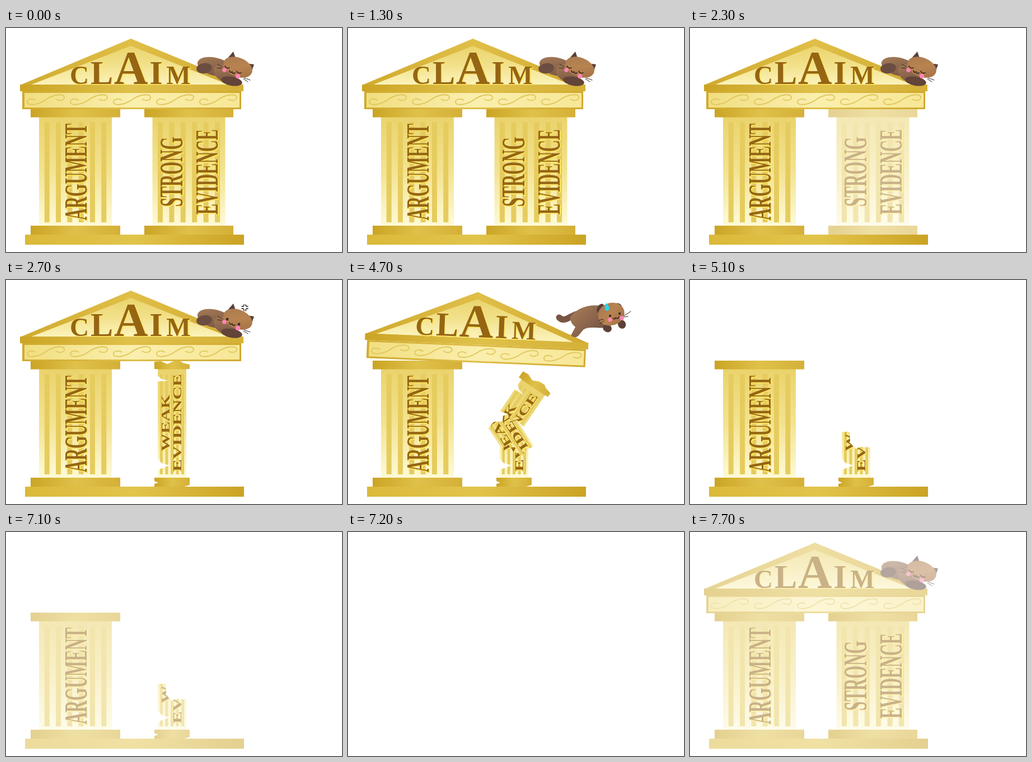
Animation of 600x400 px, one loop 7.8 s. Source, as an HTML page:

```html
<!DOCTYPE html>
<html lang="en">
<head>
<meta charset="utf-8">
<title>Claim, argument, evidence</title>
<style>
  html, body { margin: 0; width: 100%; height: 100%; overflow: hidden; background: #fff; }
  svg { display: block; width: 100vw; height: 100vh; }
  text { font-family: "Liberation Serif", serif; font-weight: bold; }
  .shine { fill: #ffec78; stroke: #ffe655; stroke-width: 1; }
  .ink { fill: #956513; }
  .line { fill: none; stroke: #35231f; stroke-width: 1.6; stroke-linecap: round; stroke-linejoin: round; }
  .thin { stroke-width: 1; }
  .pink { fill: #ff85b5; }
  .dark { fill: #3f2a25; }
</style>
</head>
<body>
<svg id="stage" viewBox="0 0 600 400"></svg>
<script>
const stage = document.getElementById('stage');

const gradient = (id, colors, direction = '') =>
  `<linearGradient id="${id}" ${direction}>` + colors.map((c, i) =>
    `<stop offset="${i / (colors.length - 1)}" stop-color="${c}"/>`).join('') + '</linearGradient>';
const down = 'x1="0" y1="0" x2="0" y2="1"';
const diagonal = 'x1="0" y1="0" x2="1" y2="1"';

const rect = (x, y, right, bottom, fill) =>
  `<rect x="${x}" y="${y}" width="${right - x}" height="${bottom - y}" fill="${fill}"/>`;
const poly = (points, fill = '') => `<polygon points="${points}" ${fill && `fill="${fill}"`}/>`;
const oval = (x, y, rx, ry, fill, turn = 0) =>
  `<ellipse cx="${x}" cy="${y}" rx="${rx}" ry="${ry}" fill="${fill}" transform="rotate(${turn} ${x} ${y})"/>`;
const dot = (x, y, r, style) => `<circle cx="${x}" cy="${y}" r="${r}" class="${style}"/>`;
const line = (d, style = '') => `<path class="line ${style}" d="${d}"/>`;
const group = (id, content) => `<g id="${id}">${content}</g>`;

// Engraved lettering: a bright lower edge under the dark face.
const engrave = (text, size, place, anchor = 'start') =>
  ['shine', 'ink'].map((style, i) =>
    `<g transform="translate(${i ? 0 : 1.3} ${i ? 0 : 1.3})"><text class="${style}" font-size="${size}"
      text-anchor="${anchor}" transform="${place}">${text}</text></g>`).join('');
const upward = (text, size, x, y, tall) =>
  engrave(text, size, `translate(${x} ${y}) rotate(-90) scale(1 ${tall})`);

function column(left, right, inset, flutes, fluteWidth) {
  const x = left + inset, end = right - inset;
  const margin = inset * .65, pitch = (end - x - 2 * margin - fluteWidth) / (flutes - 1);
  let art = rect(x, 159, end, 353, 'url(#shaft)');
  for (let i = 0; i < flutes; i++) {
    const start = x + margin + i * pitch;
    art += rect(start, 168, start + fluteWidth, 347, '#e6cc5e');
  }
  return art + rect(left, 144, right, 159.5, 'url(#gold)') + rect(left, 353, right, 369, 'url(#gold)');
}

const swirl = x => `<path d="M-18 1C-26-4-34 0-33 5C-31 11-14 10 0 0S31-11 33-5C34 0 26 4 18-1"
  transform="translate(${x} 128)" fill="none" stroke="#e0c65c" stroke-width="1.8"/>`;

const roof =
  poly('25,102 223,19 424,102', 'url(#edge)') +
  poly('44,101.5 223,32 398,101.5', 'url(#gable)') +
  rect(25, 101, 424, 113, 'url(#gold)') +
  rect(29, 113, 420, 145, 'url(#edge)') +
  rect(33, 116, 417, 142, 'url(#frieze)') +
  [71, 148, 225, 302, 379].map(swirl).join('') +
  [['C', 131, 47], ['L', 171, 60], ['A', 223, 84], ['I', 268, 60], ['M', 308, 46]].map(
    ([letter, x, size]) => engrave(letter, size, `translate(${x} 99.5)`, 'middle')).join('');

const restingCat =
  oval(373, 69, 32, 16, 'url(#fur)', 14) +
  oval(393, 82, 23, 15, 'url(#fur)', 25) +
  oval(354, 72, 14, 9, '#6b4d41', -8) +
  oval(403, 95, 19, 8, '#624438', 10) +
  poly('393,57 406,42 411,57', '#584039') + poly('428,63 443,65 437,82', '#584039') +
  oval(414, 70, 27, 17, 'url(#face)', 22) +
  dot(390, 75, 3.8, 'pink') + dot(414, 86, 4.2, 'pink') +
  line('M399 76q1 5 5 2q0 5 5 2') +
  line('M386 69l-8-4M385 72l-8-1M425 89l11 4M424 91l8 5', 'thin');

const leapingCat =
  `<path d="M377 67C386 76 394 66 408 61" fill="none" stroke="#785643" stroke-width="11" stroke-linecap="round"/>` +
  `<path d="M397 66C408 50 430 43 452 46L458 85C440 87 430 82 420 89L411 100Q405 105 398 99L406 84Q396 76 397 66Z" fill="url(#fur)"/>` +
  oval(463, 86, 8, 7, '#5d4138', 25) + oval(489, 79, 7, 8, '#5d4138', -25) +
  oval(451, 51, 6, 9, '#584039', 30) + oval(483, 47, 7, 5, '#584039', 35) +
  oval(470, 61, 24, 20, 'url(#face)', -18) +
  dot(468, 64, 2.2, 'dark') + dot(485, 60, 2.2, 'dark') +
  dot(468, 71, 3.8, 'pink') + dot(489, 68, 3.8, 'pink') +
  line('M473 68q3 4 5-1q3 4 6-1') +
  line('M493 64l12-8M493 66l7-1M456 70l-8 2M457 73l-7 5', 'thin') +
  `<path d="M461 41C467 46 469 54 463 55C457 55 458 48 461 41Z" fill="#27d7ed"/>`;

const angerMark = line('M421 47q4 1 4-3M428 44q0 4 4 3M421 51q4-1 4 4M428 55q0-5 4-4');
const snore = [[427, 60, 14], [437, 53, 18], [449, 46, 25]].map(([x, y, size], i) =>
  `<text id="z${i}" x="${x}" y="${y}" font-size="${size}" fill="#4b3833">z</text>`).join('');

const weakOutline = '265,146 276,145 288,150 299,145 310,144 316,148 328,151 328,159 322,159 ' +
  '322,353 328,353 328,366 318,369 265,369 265,364 272,362 265,359 265,353 271,353 ' +
  '271,339 292,331 278,327 271,319 271,181 291,180 278,177 271,171 271,159 265,159';
const breaks = {
  top: '255,135 340,135 340,232 305,224 299,232 285,224 260,232',
  middle: '260,232 285,224 299,232 305,224 340,232 340,300 303,298 296,302 286,291 285,271 260,272',
  stump: '260,272 285,271 286,291 296,302 303,298 340,300 340,380 260,380'
};
const clip = (id, points) => `<clipPath id="${id}">${poly(points)}</clipPath>`;
const fragment = name => `<use id="${name}" href="#pillar" clip-path="url(#${name}Cut)"/>`;

stage.innerHTML = `<defs>
  ${gradient('gold', ['#cba424', '#dfc14a', '#d5b037'])}
  ${gradient('edge', ['#d0aa2f', '#e0bf48', '#d0a92f'])}
  ${gradient('gable', ['#ead46d', '#f2e18b', '#fcf3bb'], down)}
  ${gradient('frieze', ['#f1de80', '#faefae', '#f7e796'])}
  ${gradient('plinth', ['#dbb93a', '#e2c44b', '#cba324'])}
  ${gradient('shaft', ['#ead36c', '#f3e391', '#fefad6'], down)}
  ${gradient('fur', ['#a97e58', '#8d674d', '#6b4d40'], diagonal)}
  ${gradient('face', ['#a87950', '#b88350', '#a06d44'], diagonal)}
  ${clip('weakCut', weakOutline)}
  ${Object.keys(breaks).map(name => clip(name + 'Cut', breaks[name])).join('')}
  <g id="pillar"><g clip-path="url(#weakCut)">
    ${column(265, 328, 6, 5, 5)}
    ${upward('WEAK', 32, 292, 306, .66)}${upward('EVIDENCE', 33, 313, 342, .64)}
  </g></g>
</defs>` + group('scene',
  rect(34, 369, 425, 387, 'url(#plinth)') +
  column(44, 204, 15, 6, 9) + upward('ARGUMENT', 29, 144, 343, 2) +
  group('strong', column(247, 406, 14.5, 6, 9) +
    upward('STRONG', 29.5, 315, 319, 2) + upward('EVIDENCE', 28.8, 378, 333, 2)) +
  '<use id="weak" href="#pillar"/>' +
  fragment('stump') + fragment('middle') + fragment('top') +
  group('roof', roof) +
  group('resting', restingCat +
    group('asleep', line('M391 68q2 5 8 3M412 77q2 5 8 3')) +
    group('awake', dot(395, 70, 2.4, 'dark') + dot(416, 79, 2.4, 'dark')) +
    group('anger', angerMark) + snore) +
  group('leaping', leapingCat));

const part = id => document.getElementById(id);
const show = (id, on) => part(id).setAttribute('display', on ? 'inline' : 'none');
const fade = (id, amount) => part(id).setAttribute('opacity', amount);
const move = (id, x, y, angle, cx, cy) =>
  part(id).setAttribute('transform', `translate(${x} ${y}) rotate(${angle} ${cx} ${cy})`);

function draw(now) {
  const step = Math.floor(now % 7800 / 100);
  const between = (from, to) => step >= from && step < to;
  const restored = step === 77, falling = between(47, 51);
  const n = falling ? step - 47 : 0, drop = n * n;

  fade('scene', between(72, 77) ? 0 : step === 71 || restored ? .5 : 1);
  show('strong', step < 24 || restored);
  fade('strong', step === 23 ? .5 : 1);
  show('weak', between(25, 47));
  fade('weak', step === 25 ? .5 : 1);
  show('stump', between(47, 77));
  for (const id of ['middle', 'top', 'leaping']) show(id, falling);
  show('roof', step < 51 || restored);
  show('resting', step < 47 || restored);
  show('asleep', step < 26 || restored);
  show('awake', between(26, 47));
  show('anger', between(27, 47));
  for (let i = 0; i < 3; i++) show('z' + i, between(10 + i, 13));

  if (falling) {
    move('roof', 5.5 + 25 * n, 2.5 + 35 * drop, 2.44 + 9 * n, 224.5, 101);
    move('middle', -10 - 12 * n, 18 + 25 * drop, -33 - 18 * n, 297, 255);
    move('top', 16 + 20 * n, 27 + 25 * drop, 34 + 20 * n, 297, 192);
    move('leaping', 50 * n, 12 * drop, 8 * n, 440, 70);
  } else {
    part('roof').removeAttribute('transform');
  }
}

function tick() {
  draw(performance.now());
  requestAnimationFrame(tick);
}
tick();
</script>
</body>
</html>
```
